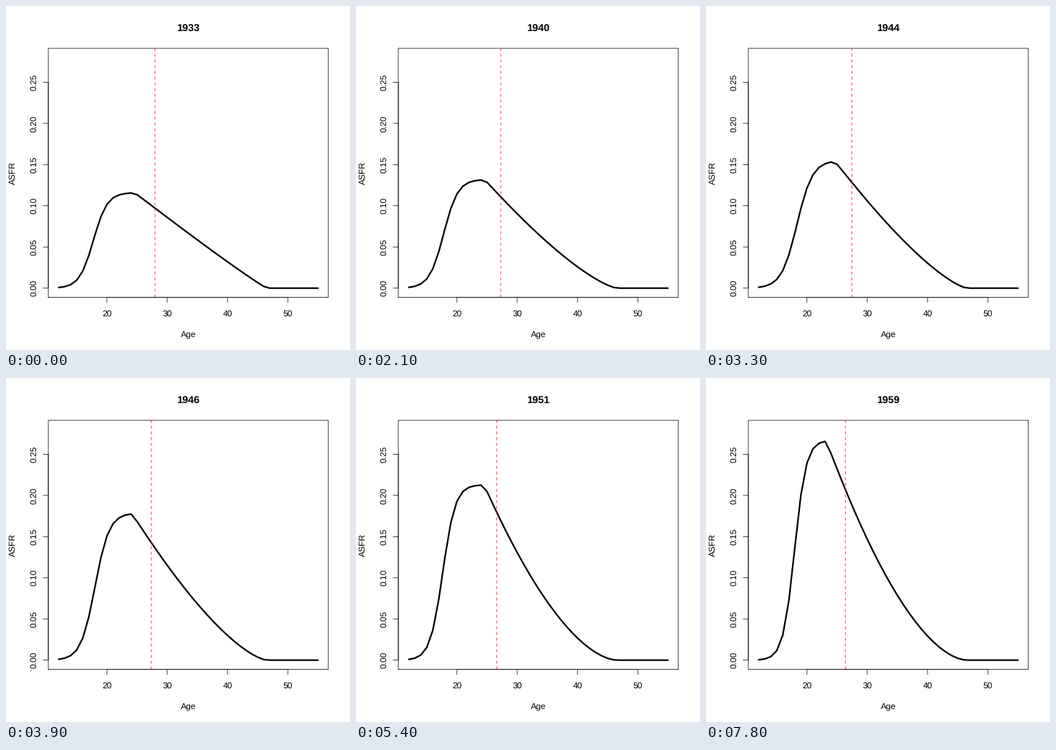
A matplotlib script that plays this animation: 480x480 px, repeating every 8000 ms.

```python
import numpy as np
import matplotlib.pyplot as plt
from matplotlib.animation import FuncAnimation

PX = 0.75  # points per pixel at 96 dpi
plt.rcParams.update({"font.family": "Liberation Sans", "text.hinting": "none"})

FIRST, LAST = 1933, 1959
AGES = np.arange(12, 56)
OLDEST = 46.5

# Key years of each curve parameter, linear in between
HEIGHT = {1933: 0.116, 1940: 0.132, 1943: 0.166, 1945: 0.144, 1947: 0.213,
          1948: 0.202, 1950: 0.2, 1951: 0.213, 1957: 0.268, 1959: 0.267}
RISE_AGE = {1933: 17.75, 1940: 17.8, 1944: 18.35, 1948: 17.7, 1951: 17.65, 1959: 17.95}
RISE_RATE = {1933: 0.87, 1940: 0.85, 1944: 0.78, 1948: 0.93, 1959: 1.05}
FALL_AGE = {1944: 24.6, 1948: 23.7, 1951: 24.5, 1955: 23.2}
FALL_POWER = {1933: 1.06, 1940: 1.34, 1944: 1.34, 1951: 1.7, 1955: 1.62, 1959: 1.73}
MEAN_AGE = {1933: 27.97, 1940: 27.27, 1942: 27.0, 1945: 27.7, 1948: 26.68, 1959: 26.36}


def at(track, year):
    return np.interp(year, list(track), list(track.values()))


def rates(year):
    """Logistic rise to a plateau, then a power-law fall to the oldest age."""
    rise = 1 / (1 + np.exp(-at(RISE_RATE, year) * (AGES - at(RISE_AGE, year))))
    left_over = (OLDEST - AGES) / (OLDEST - at(FALL_AGE, year))
    fall = np.clip(left_over, 0, 1) ** at(FALL_POWER, year)
    return at(HEIGHT, year) * rise * fall


def px(age):
    return 59.04 + (age - 10.28) * 390.72 / 46.44


def py(rate):
    return 393.69 - rate * 321.78 / 0.28


fig = plt.figure(figsize=(5, 5), dpi=96, facecolor="white")
ax = fig.add_axes([0, 0, 1, 1])
ax.set_xlim(0, 480)
ax.set_ylim(480, 0)
ax.axis("off")


def thin(xs, ys):
    ax.plot(xs, ys, color="black", lw=0.75 * PX, snap=False,
            solid_capstyle="round", solid_joinstyle="round")


def label(x, y, text, size=12, **kw):
    return ax.text(x, y, text, fontsize=size * PX, ha="center", va="baseline",
                   rotation_mode="anchor", **kw)


left, right, top, bottom = 59.04, 449.76, 59.04, 406.56
thin([left, right, right, left, left], [bottom, bottom, top, top, bottom])
thin([px(20), px(50)], [bottom, bottom])
thin([left, left], [py(0), py(0.25)])
for age in range(20, 60, 10):
    thin([px(age)] * 2, [bottom, bottom + 7.2])
    label(px(age), 433, str(age))
for rate in np.arange(6) * 0.05:
    thin([left - 7.2, left], [py(rate)] * 2)
    label(42, py(rate), f"{rate:.2f}", rotation=90)
label(254.4, 462, "Age")
label(13, 232.8, "ASFR", rotation=90)

title = label(254.4, 35, "", 14.4, weight="bold")
curve, = ax.plot([], [], color="black", lw=2.25 * PX,
                 solid_capstyle="round", solid_joinstyle="round")
# Dashes are in units of the line width: 4 px on, 4 px off
mean_line, = ax.plot([], [], color="red", lw=0.75 * PX, snap=False,
                     linestyle=(0, (4 / 0.75, 4 / 0.75)), dash_capstyle="butt")


def update(i):
    year = min(FIRST + i // 3, LAST)
    title.set_text(str(year))
    curve.set_data(px(AGES), py(rates(year)))
    x = px(at(MEAN_AGE, year))
    mean_line.set_data([x, x], [bottom, top])
    return title, curve, mean_line


anim = FuncAnimation(fig, update, frames=80, interval=100, repeat=True,
                     repeat_delay=0, blit=False)
plt.show()
```
